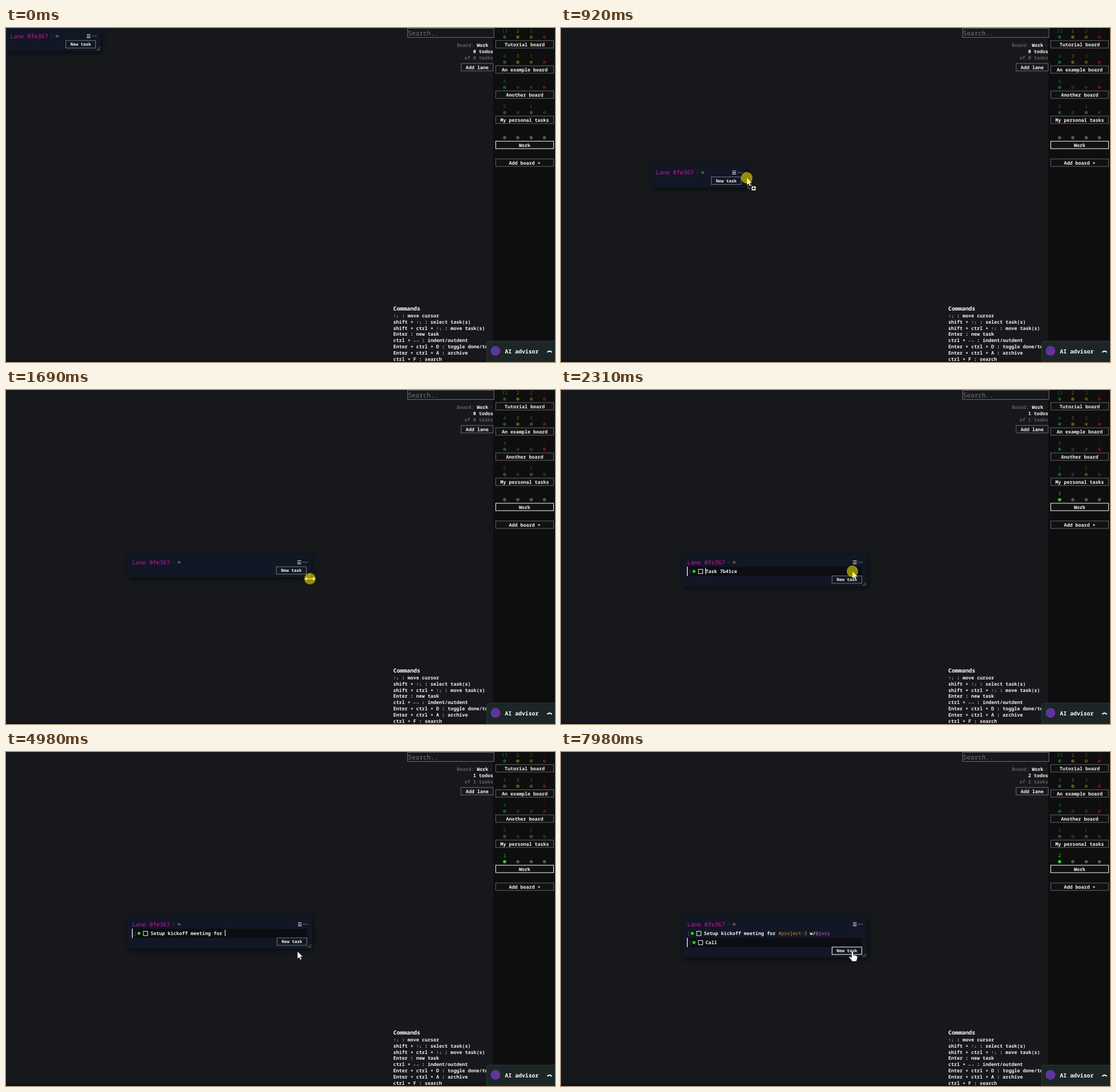
Write an HTML page that moves like this. It is 959 by 584 pixels and loops after 8 s.

```html
<!DOCTYPE html>
<html lang="en">
<head>
<meta charset="utf-8">
<title>Task board</title>
<style>
  html, body { margin: 0; width: 100%; height: 100%; overflow: hidden; background: #17181b; }
  svg { display: block; width: 959px; height: 584px; }
  text {
    font-family: "Noto Sans Mono", "DejaVu Sans Mono", monospace;
    white-space: pre;
    text-rendering: geometricPrecision;
  }
  .lane { filter: drop-shadow(2px 3px 5px rgba(0, 0, 0, .55)); }
</style>
</head>
<body>
<svg viewBox="0 0 959 584">
  <defs>
    <linearGradient id="badge" x2="1" y2="1">
      <stop stop-color="#43409f"/><stop offset="1" stop-color="#7a2a9c"/>
    </linearGradient>
  </defs>
  <g id="back"></g>
  <g id="live"></g>
  <g id="front"></g>
  <g id="pointer"></g>
</svg>
<script>
const LOOP = 8000;
const SMALL = 8.35;
const COLUMNS = [871, 894, 917.5, 940.5];
const TASK = "Setup kickoff meeting for #project-3 w/@jory";
const CALL = "Call ";

// Typing bursts: start, end, characters
const BURSTS = [
  [2950, 3200, 4], [3340, 3610, 4], [3760, 3890, 3], [4070, 4690, 11], [4870, 4980, 4],
  [5160, 5740, 9], [5890, 6030, 2], [6200, 6390, 2], [6600, 6940, 5]
];
const CALL_BURSTS = [[7480, 7760, 5]];

// Pointer stops: time, x, y
const STOPS = [
  [1030, 371, 307], [1170, 371, 307], [1300, 376, 328], [1690, 531, 330], [1730, 532, 330],
  [1780, 532, 330], [1900, 509, 317], [2350, 509, 317], [2490, 509, 348.5]
];
const PRESSES = [[490, 1030], [1300, 1760], [2270, 2350]];

const $ = id => document.getElementById(id);
const clamp = u => Math.max(0, Math.min(1, u));
const smooth = u => u * u * (3 - 2 * u);
const mix = (a, b, u) => a + (b - a) * u;
const out = (u, k) => 1 - (1 - u) ** k;
const during = (t, a, b) => t >= a && t < b;

const text = (x, y, s, fill = "#f2f2f2", size = SMALL, weight = 700, anchor = "start") =>
  `<text x="${x}" y="${y}" fill="${fill}" font-size="${size}" font-weight="${weight}" text-anchor="${anchor}">${s}</text>`;
const rect = (x, y, w, h, fill, stroke = "none") =>
  `<rect x="${x}" y="${y}" width="${w}" height="${h}" fill="${fill}" stroke="${stroke}"/>`;
const dot = (x, y, r, fill) => `<circle cx="${x}" cy="${y}" r="${r}" fill="${fill}"/>`;
const path = (d, stroke, width = 1, fill = "none") =>
  `<path d="${d}" stroke="${stroke}" stroke-width="${width}" fill="${fill}"/>`;
const button = (x, y, w, label, border = "#717174", fill = "#17181b", size = SMALL) =>
  rect(x + .5, y + .5, w - 1, 13, fill, border) +
  text(x + w / 2, y + 7 + size * .36, label, "#f2f2f2", size, 700, "middle");
const gear = (x, y, color) =>
  `<circle cx="${x}" cy="${y}" r="1.6" fill="none" stroke="${color}" stroke-dasharray="1 .6"/>`;

function counters(y, counts, colors, grey) {
  return counts.map((n, i) =>
    (n ? text(COLUMNS[i], y + 3.2, n, colors[i][0], SMALL, 400, "middle") : "") +
    dot(COLUMNS[i], y + 10.7, 2.8, n ? colors[i][1] : grey)).join("");
}

function sidebar() {
  const dim = [["#1f6a20", "#1b5c1c"], ["#77720f", "#615d12"], ["#6b4713", "#5f3f14"], ["#451416", "#611517"]];
  const boards = [
    ["Tutorial board", [13, 2, 2, 2]], ["An example board", [4, 3, 3, 1]],
    ["Another board", [4, 0, 0, 2]], ["My personal tasks", [5, 0, 1, 0]]
  ];
  return rect(851, 0, 108, 584, "#0e0e0f") +
    boards.map(([name, counts], i) =>
      counters(5 + 44 * i, counts, dim, "#2a2a2c") + button(855, 21.5 + 44 * i, 102, name, "#66666a", "#111112")).join("") +
    button(855, 197.5, 102, "Work", "#fff", "#111112") +
    button(855, 228.5, 102, "Add board +", "#66666a", "#111112");
}

function header() {
  return rect(701.5, .5, 151, 16, "#17181b", "#6b6b6d") +
    text(702, 12.5, "Search..", "#757575", 11.1, 400) +
    text(787.5, 33.2, 'Board: <tspan fill="#f2f2f2">Work</tspan>', "#5d5e61") +
    gear(847, 30.5, "#3a3b3e") + button(794.5, 61.5, 57, "Add lane");
}

function commands() {
  const lines = [
    "↑↓ : move cursor", "shift + ↑↓ : select task(s)", "shift + ctrl + ↑↓ : move task(s)",
    "Enter : new task", "ctrl + ←→ : indent/outdent", "Enter + ctrl + D : toggle done/todo",
    "Enter + ctrl + A : archive", "ctrl + F : search"
  ];
  return text(676.5, 494.3, "Commands", "#fff", 9.8) +
    lines.map((s, i) => text(676.5, 506 + 10.8 * i, s)).join("");
}

function advisor() {
  return '<rect x="839.5" y="547.5" width="130" height="50" rx="4" fill="#1d2626" stroke="#2c3736"/>' +
    dot(855, 564.5, 8.5, "url(#badge)") +
    text(871.5, 569, "AI advisor", "#fff", 9.8) +
    path("M945.5 567 Q949.5 563 953.5 567", "#fff", 2);
}

const typed = (t, bursts) => bursts.reduce((sum, [a, b, n]) =>
  sum + (t < a ? 0 : Math.min(n, 1 + Math.floor((t - a) / (b - a) * (n - 1)))), 0);

const tagged = s => s.replace(/[#@]\S*/g, tag =>
  `<tspan fill="${tag[0] === "#" ? "#e2873a" : "#c265e6"}" font-weight="500">${tag}</tspan>`);

function pointerAt(t) {
  if (t < 710) {
    const u = smooth(clamp((t - 100) / 430));
    return [mix(883, 159, u), mix(551, 19, u)];
  }
  if (t < 1030) {
    const u = (t - 710) / 320;
    return [mix(159, 371, out(u, 1.41)), mix(19, 307, out(u, 1.72))];
  }
  const i = STOPS.findIndex(s => s[0] > t);
  if (i < 0) return STOPS.at(-1).slice(1);
  const [a, b] = [STOPS[i - 1], STOPS[i]];
  const u = smooth((t - a[0]) / (b[0] - a[0]));
  return [mix(a[1], b[1], u), mix(a[2], b[2], u)];
}

// One task row; coordinates are relative to the lane
function row(y, s, w, focused, caret, selected) {
  const x = focused ? 0 : -3;
  let r = focused ? rect(7, y, w - 15, 16, "#0b0d13") + rect(7, y, 1.3, 16, "#fff") : "";
  if (s) {
    r += [5, 8, 11].map(d => rect(12.5 + x, y + d, 1.2, 1.2, "#77797e")).join("") +
      dot(19.3 + x, y + 8, 2.6, "#25dc1c") +
      rect(27 + x, y + 4.5, 7.5, 7.5, "none", "#f2f2f2") +
      (selected ? rect(39.5, y + 2, s.length * 5.01, 11, "#2b5f9e") : "") +
      text(39.5 + x, y + 11, tagged(s));
  }
  return r + (caret >= 0 ? rect(s ? 39 + caret * 5.01 : 16, y + 2, 1.1, 11, "#fff") : "");
}

function taskRows(t, w) {
  if (t < 2310) return "";
  if (t < 2950) {
    const selected = t >= 2670;
    return row(22, "Task 7b41ce", w, true, selected ? 11 : 0, selected);
  }
  const n = typed(t, BURSTS);
  if (t < 7160) return row(22, TASK.slice(0, n), w, true, n);
  const m = typed(t, CALL_BURSTS);
  const caretOff = during(t, 7340, 7480) || t >= 7980;
  return row(22, TASK, w, false, -1) + row(38, CALL.slice(0, m), w, true, caretOff ? -1 : m);
}

function lane(t, x, y, w, rows, hover, dragging) {
  const h = 40.5 + 16 * rows;
  const grip = dragging ? "" :
    path(`M${w - 7} ${h - 1}L${w - 1} ${h - 7}M${w - 3.5} ${h - 1}L${w - 1} ${h - 3.5}`, "#9a9da3", .9);
  return `<g transform="translate(${x} ${y})">
    <g class="lane">${rect(0, 0, w, h, "#111724")}</g>` +
    text(7.5, 17.6, "Lane 0fe367", "#d612a6", 10, 400) +
    gear(80, 14.3, "#35483f") + rect(87.7, 13, 3.4, 2.6, "none", "#777a80") +
    path(`M${w - 24} 11.5h6.5m-6.5 2.7h6.5m-6.5 2.7h6.5`, "#e4e4e4", 1.1) +
    [-14, -11, -8].map(d => rect(w + d - .8, 13.6, 2, 1.3, "#777a80")).join("") +
    taskRows(t, w) +
    button(w - 61, 21.5 + 16 * rows, 53, "New task", hover ? "#fff" : "#74777d", "#111724", 7.5) +
    grip + "</g>";
}

function pointer(x, y, kind, pressed) {
  const arrow = path("M0 0V13.2L3.1 10.4L5.2 15L7.4 14L5.4 9.5H9.6Z", "#111", .6, "#fff");
  const shapes = {
    arrow,
    copy: path("M2 13.5V18.5H9M9 13H2", "#ddd", 1).replace("/>", ' stroke-dasharray="2 1.5"/>') +
      arrow + rect(8, 14.5, 8, 8, "#fff", "#111") + path("M12 16v5m-2.5 -2.5h5", "#000", 1.3),
    resize: path("M-9.5 0L-5 -4V-1H5V-4L9.5 0L5 4V1H-5V4Z", "#111", .5, "#fff"),
    hand: path("M-1.5 1Q0 -1 1.5 1V7Q3 5.8 4.2 7.2Q5.7 6.3 6.6 7.9Q8.5 7.3 8.8 9.5V12" +
      "Q8.5 14 7.3 15.5V17.5H-1.2V16L-5.8 10.5Q-5.5 8.4 -3.5 9.4L-1.5 11.2Z", "#111", .6, "#fff")
  };
  return `<g transform="translate(${x} ${y})">${shapes[kind]}` +
    (pressed ? '<circle r="10" fill="#fff000" opacity=".55"/>' : "") + "</g>";
}

function draw(t) {
  const [px, py] = pointerAt(t);
  const u = clamp((t - 710) / 320);
  const x = 213 * out(u, 1.26), y = 287 * out(u, 1.65);
  const w = t < 1300 ? 165 : t < 1780 ? Math.max(165, px - 211) : 321;
  const rows = t < 2310 ? 0 : t < 7160 ? 1 : 2;
  const count = t < 2310 ? 0 : t < 7480 ? 1 : 2;
  const dragging = during(t, 710, 1030);
  const resizing = during(t, 1260, 1800);
  const top = y + 21.5 + 16 * rows;
  const hover = t >= 1800 && during(px, x + w - 61, x + w - 8) && during(py, top, top + 14);
  const kind = dragging ? "copy" : resizing ? "resize" : hover ? "hand" : "arrow";

  $("live").innerHTML =
    text(851, 44.2, count + " todos", "#f2f2f2", SMALL, 700, "end") +
    text(851, 55, `of ${count} tasks`, "#5d5e61", SMALL, 700, "end") +
    counters(181, [count, 0, 0, 0], [["#25dc1c", "#25dc1c"]], "#59595b") +
    lane(t, x, y, w, rows, hover, dragging);
  $("pointer").innerHTML = t < 100 ? "" :
    pointer(px, py, kind, PRESSES.some(([a, b]) => during(t, a, b)));
}

$("back").innerHTML = rect(0, 0, 959, 584, "#17181b") + rect(0, 580, 851, 4, "#121114") + sidebar() + header();
$("front").innerHTML = commands() + advisor();

function tick() {
  draw(performance.now() % LOOP);
  requestAnimationFrame(tick);
}
tick();
</script>
</body>
</html>
```
